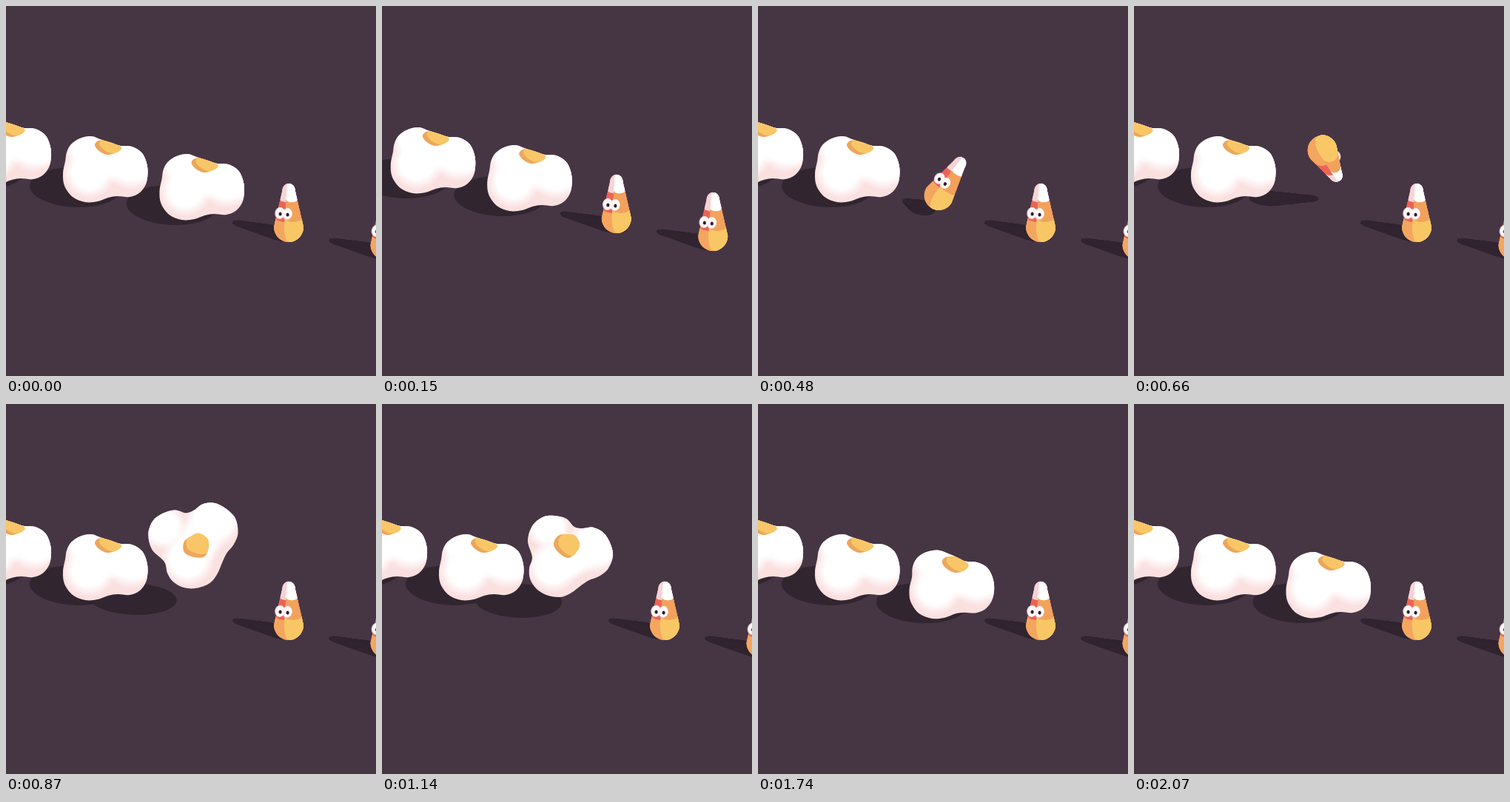
An HTML page with a canvas for the animation above (2.1 s loop, 500 by 500 pixels).

```html
<!DOCTYPE html>
<html lang="en">
<head>
<meta charset="utf-8">
<title>Candy to popcorn</title>
<style>
  html, body { margin: 0; width: 100%; height: 100%; overflow: hidden; background: #463644; }
  canvas { display: block; width: 100vw; height: 100vh; }
</style>
</head>
<body>
<canvas id="stage" width="500" height="500"></canvas>
<script>
const ctx = document.getElementById('stage').getContext('2d');
const LOOP = 2100, STEP = 30, SLIDE_END = 300, JUMP = 430, POP = 780;
const GAP = { x: 130.5, y: 24 };
const SHADOW = '#312530';

const clamp = v => Math.max(0, Math.min(1, v));
const mix = (a, b, k) => a + (b - a) * k;
const smooth = k => { k = clamp(k); return k * k * (3 - 2 * k); };

// Piecewise linear value from [time, value] steps.
function track(t, steps) {
  for (let i = 1; i < steps.length; i++) {
    const [t0, v0] = steps[i - 1], [t1, v1] = steps[i];
    if (t <= t1) return mix(v0, v1, clamp((t - t0) / (t1 - t0)));
  }
  return steps[steps.length - 1][1];
}

function points(cx, cy, list) {
  const out = [];
  for (let i = 0; i < list.length; i += 2) out.push([list[i] - cx, list[i + 1] - cy]);
  return out;
}
const mixPoints = (a, b, k) => a.map((p, i) => [mix(p[0], b[i][0], k), mix(p[1], b[i][1], k)]);
const mixPose = (a, b, k) => ({ body: mixPoints(a.body, b.body, k), nut: mixPoints(a.nut, b.nut, k) });

// Popcorn poses: outline runs clockwise from the upper left lobe.
const REST = {
  body: points(134, 221, [82,198, 88,187, 100,179, 115,176, 127,180, 143,185, 155,189,
    170,190, 184,199, 191,217, 190,238, 181,252, 167,258, 151,257,
    138,259, 124,264, 107,265, 90,258, 79,243, 77,226, 80,210]),
  nut: points(134, 221, [120,188, 125,182, 138,181, 149,186, 156,192, 149,198, 137,201, 126,196])
};
const FLY = {
  body: points(254.5, 206, [197,185, 203,165, 217,153, 233,151, 249,155, 260,166, 271,168,
    286,167, 302,177, 312,201, 306,222, 293,233, 280,238, 268,246,
    256,255, 241,261, 222,258, 208,249, 200,236, 199,222, 203,207]),
  nut: points(254.5, 206, [232,190, 238,178, 250,176, 261,178, 267,190, 262,201, 252,208, 240,202])
};
const LAND = {
  body: points(256.5, 241, [201,215, 206,200, 219,191, 237,189, 252,192, 263,203, 271,212,
    286,214, 302,220, 313,240, 312,260, 303,276, 290,283, 275,284,
    263,285, 250,291, 233,293, 212,286, 200,268, 199,250, 204,235]),
  nut: points(256.5, 241, [247,220, 250,212, 263,211, 276,215, 282,225, 279,236, 267,238, 254,231])
};

// Closed smooth curve through all points.
function blob(pts) {
  const n = pts.length, p = i => pts[(i + n) % n];
  ctx.beginPath();
  ctx.moveTo(...pts[0]);
  for (let i = 0; i < n; i++) {
    const a = p(i - 1), b = p(i), c = p(i + 1), d = p(i + 2);
    ctx.bezierCurveTo(b[0] + (c[0] - a[0]) / 6, b[1] + (c[1] - a[1]) / 6,
      c[0] - (d[0] - b[0]) / 6, c[1] - (d[1] - b[1]) / 6, c[0], c[1]);
  }
  ctx.closePath();
}

function oval(x, y, rx, ry, angle, color) {
  ctx.fillStyle = color;
  ctx.beginPath();
  ctx.ellipse(x, y, Math.max(rx, 0.1), Math.max(ry, 0.1), angle, 0, Math.PI * 2);
  ctx.fill();
}

function glow(x, y, r) {
  const g = ctx.createRadialGradient(x, y, 0, x, y, r);
  g.addColorStop(0, '#fff');
  g.addColorStop(0.62, '#fff');
  g.addColorStop(1, 'rgba(255,255,255,0)');
  ctx.fillStyle = g;
  ctx.fillRect(x - r, y - r, r * 2, r * 2);
}

function center(pts, from, to) {
  const part = pts.slice(from, to);
  return [0, 1].map(i => part.reduce((sum, p) => sum + p[i], 0) / part.length);
}

function popcorn({ x, y, pose, size = 1, turn = 0, nutDrop = 0 }) {
  ctx.save();
  ctx.translate(x, y);
  ctx.rotate(turn);
  ctx.scale(size, size);
  const { body, nut } = pose;
  blob(body);
  ctx.fillStyle = '#fbe0e0';
  ctx.fill();
  ctx.clip();
  const top = center(body, 0, 5), right = center(body, 6, 13), low = center(body, 14, 21);
  const mid = center(nut, 0, 8);
  glow(low[0] + 13, low[1] - 22, 36);
  glow(top[0] + 5, top[1] + 4, 31);
  glow(right[0] - 8, right[1] - 9, 38);
  glow(right[0] + 5, right[1] - 14, 34);
  glow(mid[0] + 5, mid[1] + 16, 32);

  ctx.translate(0, nutDrop);
  blob(nut);
  ctx.fillStyle = '#eda65c';
  ctx.fill();
  ctx.clip();
  ctx.translate(6, -2);
  blob(nut);
  ctx.fillStyle = '#f8c667';
  ctx.fill();
  ctx.fillRect(mid[0], mid[1] - 30, 40, 60);
  ctx.restore();
}

function popcornShadow({ x, lift = 0, size = 1, ground }) {
  oval(x - 40 - 0.86 * lift, ground + 24 - 0.12 * lift,
    (62 - 0.09 * lift) * size, (27 - 0.11 * lift) * size, 0.04, SHADOW);
}

const CANDY_LEN = 82, PIVOT = 0.45, SLICES = 90;
function candyRadius(s) {
  if (s < 0.25) return 20 * Math.sqrt(1 - ((0.25 - s) / 0.25) ** 2);
  if (s < 0.87) return mix(20, 9, (s - 0.25) / 0.62);
  return 9 * Math.sqrt(Math.max(0, 1 - ((s - 0.87) / 0.13) ** 2));
}
const bandOf = s => s < 0.4 ? 0 : s < 0.72 ? 1 : 2;
const DARK = ['#f4a660', '#ec6458', '#f6d3d5'];
const LIGHT = ['#f9c766', '#f2a25c', '#ffffff'];

// Discs along the candy axis; depth is how far the tip leans to the viewer.
function candySlices({ x, y, turn = 0, depth = 0.31, stretch = 1 }) {
  const len = CANDY_LEN * Math.sqrt(1 - depth * depth) * stretch;
  const dx = Math.sin(turn), dy = -Math.cos(turn);
  const list = [];
  for (let i = 0; i <= SLICES; i++) {
    const s = i / SLICES, d = (s - PIVOT) * len;
    list.push({ x: x + dx * d, y: y + dy * d, r: candyRadius(s) / Math.sqrt(stretch), band: bandOf(s) });
  }
  return depth < 0 ? list.reverse() : list;
}

function eyes({ x, y, turn = 0 }) {
  ctx.save();
  ctx.translate(x, y);
  ctx.rotate(turn);
  for (const [ex, ey] of [[-2, -2], [-12, -3]]) {
    oval(ex, ey, 6.8, 8, 0.1, '#f2d3d6');
    oval(ex + 0.6, ey - 0.3, 6, 7.4, 0.1, '#fff8f8');
    oval(ex + 0.6, ey + 1, 2.1, 2.5, 0, '#2b2029');
  }
  ctx.restore();
}

function candy(c) {
  const depth = c.depth ?? 0.31, turn = c.turn ?? 0, k = Math.abs(depth);
  const slices = candySlices(c);
  if (depth < -0.2) eyes(c);
  for (const s of slices) oval(s.x, s.y, s.r, s.r * k, turn, DARK[s.band]);
  // The lit side always faces right on screen.
  for (const s of slices) {
    const side = Math.cos(turn) < 0 ? -0.35 : 0.35;
    oval(s.x + Math.cos(turn) * s.r * Math.abs(side) * Math.sign(side),
      s.y + Math.sin(turn) * s.r * side, s.r * 0.65, s.r * k * 0.94, turn, LIGHT[s.band]);
  }
  if (depth >= -0.2) eyes(c);
}

function candyShadow(c) {
  const air = clamp((c.lift ?? 0) / 50), floor = c.ground - 8;
  for (const s of candySlices(c)) {
    const h = floor - s.y;
    oval(s.x - 1.05 * h + 24 * air, mix(floor - 0.25 * h, c.ground - 34, air),
      s.r * 0.9, s.r * 0.5, 0.15, SHADOW);
  }
}

function restingCandy(x, ground) {
  return { x, y: ground - 35, ground };
}

function jumpingCandy(t) {
  const ground = 294;
  if (t < JUMP) {
    const stretch = track(t, [[SLIDE_END, 1], [380, 0.86], [JUMP, 1.04]]);
    return { x: 251.5, y: ground - 35 * stretch, ground, stretch };
  }
  const k = (t - JUMP) / 230;
  const lift = 57 * (1 - ((740 - t) / 310) ** 2);
  return {
    x: 251.5 + 9 * Math.min(k, 1.1), y: 259 - lift, ground, lift,
    turn: 2.65 * k, depth: mix(0.31, -0.68, smooth(k))
  };
}

function poppedCorn(t) {
  const settle = track(t, [[1470, 0], [1620, 0.6], [1860, 0.95], [2070, 1]]);
  const pose = t < 1470 ? mixPose(FLY, LAND, smooth((t - 1140) / 260)) : mixPose(LAND, REST, settle);
  const fall = Math.min(241, 179 + 27 * ((t - 960) / 180) ** 2);
  const before = Math.max(0, 1140 - t) / 360;
  return {
    x: track(t, [[POP, 261], [1140, 254.5], [1470, 256.5], [1620, 260], [1800, 262.5], [2070, 262.5], [LOOP, 264.5]]),
    y: t < 1470 ? fall : mix(241, 245, settle),
    pose, lift: Math.max(0, 241 - fall) * (t < 1470), ground: 246 - settle,
    size: track(t, [[POP, 0.5], [840, 1.06], [900, 1]]),
    turn: -0.7 * before, nutDrop: 26 * before
  };
}

function draw(t) {
  const p = smooth(t / SLIDE_END);
  const corns = [], candies = [];
  for (let i = 2; i >= 0; i--) {
    const y = 245 - GAP.y * (i + p);
    corns.push({ x: 264.5 - GAP.x * (i + p), y, pose: REST, ground: y });
  }
  for (let i = 0; i < 3; i++) {
    if (i || t < SLIDE_END) candies.push(restingCandy(382 + GAP.x * (i - p), 318 + GAP.y * (i - p)));
  }
  if (t >= POP) corns.push(poppedCorn(t));
  else if (t >= SLIDE_END) candies.unshift(jumpingCandy(t));

  ctx.fillStyle = '#463644';
  ctx.fillRect(0, 0, 500, 500);
  corns.forEach(popcornShadow);
  candies.forEach(candyShadow);
  corns.forEach(popcorn);
  candies.forEach(candy);
}

const start = performance.now();
function frame() {
  const t = (performance.now() - start) % LOOP;
  draw(Math.floor(t / STEP) * STEP);
  requestAnimationFrame(frame);
}
frame();
</script>
</body>
</html>
```
